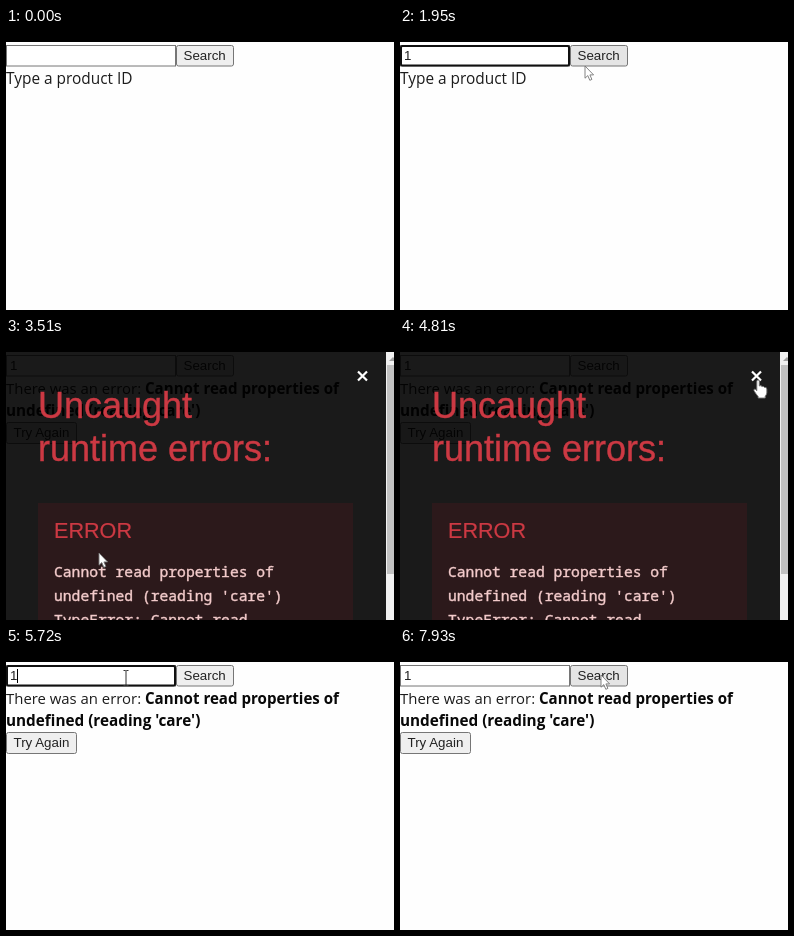
Recreate the animation shown at these times as an HTML page. Size 388 by 282 pixels, loop 8 s.

```html
<!DOCTYPE html>
<html lang="en">
<head>
<meta charset="utf-8">
<title>Product search error</title>
<style>
  html, body { margin: 0; width: 100%; height: 100%; overflow: hidden; background: #fefefe; }
  svg { display: block; width: 388px; height: 282px; }
  text { white-space: pre; }
  .ui { font: 13.333px "Liberation Sans", Arial, sans-serif; fill: #222; }
  .body { font-family: "Open Sans", "Noto Sans", sans-serif; font-size: 14.9px; fill: #1c1c1c; }
  .bold { font-size: 15.1px; font-weight: 700; fill: #080808; }
  .box { stroke: #767676; }
  .head { font-family: "Liberation Sans", Arial, sans-serif; fill: #cc3943; stroke: #cc3943; stroke-width: .4; }
  .mono { font: 500 14.66px "Noto Sans Mono", "DejaVu Sans Mono", monospace; fill: #f3cbcb; stroke: #f3cbcb; stroke-width: .4; }
  .pointer { fill: #fff; stroke: #777; stroke-width: .9; }
</style>
</head>
<body>
<svg viewBox="0 0 388 282">
  <rect width="388" height="282" fill="#fefefe"/>

  <rect class="box" x=".5" y="17.5" width="169" height="20.5" fill="#fff"/>
  <rect id="ring" x="1" y="18" width="168" height="19.5" rx="1.5" fill="#fff" stroke="#101010" stroke-width="2"/>
  <text id="value" class="ui" x="4" y="32">1</text>
  <rect id="caret" y="21" width="1" height="14"/>

  <rect id="search" class="box" x="170.5" y="17.5" width="57" height="20.5" rx="2"/>
  <text class="ui" x="177.5" y="32">Search</text>

  <text id="hint" class="body" x="0" y="56" style="font-size:15.4px">Type a product ID</text>

  <g id="failure">
    <text class="body" x="0" y="56">There was an error: </text>
    <text class="body bold" x="139" y="56">Cannot read properties of</text>
    <text class="body bold" x="0" y="77.5" style="font-size:15.3px">undefined (reading 'care')</text>
    <rect class="box" x=".5" y="84.5" width="70" height="21" rx="2" fill="#efefef"/>
    <text class="ui" x="7.5" y="99">Try Again</text>
  </g>

  <g id="overlay">
    <rect y="14" width="380" height="268" fill="#000" opacity=".898"/>
    <rect x="32" y="165" width="315" height="117" fill="#2c191b"/>
    <g class="head">
      <text x="32" y="80" font-size="36">Uncaught</text>
      <text x="32" y="123" font-size="36">runtime errors:</text>
      <text x="48" y="200" font-size="21.6" stroke-width=".2">ERROR</text>
    </g>
    <g class="mono">
      <text x="48" y="239">Cannot read properties of</text>
      <text x="48" y="263">undefined (reading 'care')</text>
      <text x="48" y="287">TypeError: Cannot read</text>
    </g>
    <path d="M352 33.5l9 9m0-9l-9 9" stroke="#fff" stroke-width="2.2"/>
    <rect x="380" y="14" width="8" height="268" fill="#f1f1f1"/>
    <rect x="381" y="27" width="7" height="209" fill="#c1c1c1"/>
    <path d="M383 23l4-4 1 1v3z" fill="#a0a0a0"/>
  </g>

  <rect width="388" height="14"/>

  <g id="cursor" stroke-linejoin="round">
    <path id="arrow" class="pointer" d="M0 0V12.2L2.8 9.6 4.8 14.3 6.9 13.4 4.9 8.9H8.6Z"/>
    <path id="beam" d="M-2.5-7.5H-.6L0-7 .6-7.5H2.5M0-7V7M-2.5 7.5H-.6L0 7 .6 7.5H2.5" fill="none" stroke="#333"/>
    <path id="hand" class="pointer" d="M-1.2 1.4Q-1.2 0 0 0T1.3 1.4V6Q3.2 5 3.9 6.6 5.8 6 6.4 7.4 8.6 7 8.8 9V13Q8.4 15 7.2 16.2V18H.2V16.6Q-2 14-4 10.7-4.6 8.8-2.8 9.2L-1.2 10.8Z"/>
  </g>
</svg>
<script>
const LOOP = 8000, TICK = 130;
const ERROR_AT = 3510, CLOSE_AT = 4940;

// Pointer stops: time, x, y
const stops = [
  [130, 112, 172], [520, 134, 30], [1170, 134, 30],
  [1950, 185, 38], [2340, 199, 28], [2730, 199, 28],
  [3510, 93, 215], [3640, 93, 215], [4550, 358, 42],
  [4940, 358, 42], [5720, 120, 30], [6760, 120, 30],
  [7410, 201, 27], [LOOP, 201, 27]
];

const $ = id => document.getElementById(id);
const show = (id, on) => $(id).setAttribute("visibility", on ? "inherit" : "hidden");
const within = (t, ...spans) => spans.some(([a, b]) => t >= a && t < b);
const ease = k => k * k * (3 - 2 * k);

function pointerAt(t) {
  const i = stops.findIndex(s => s[0] > t);
  if (i < 1) return stops[0].slice(1);
  const [t0, x0, y0] = stops[i - 1], [t1, x1, y1] = stops[i];
  const k = ease((t - t0) / (t1 - t0));
  return [x0 + (x1 - x0) * k, y0 + (y1 - y0) * k];
}

function render(time) {
  const t = Math.floor(time / TICK) * TICK;
  const [x, y] = pointerAt(t);
  const visible = within(t, [130, 1170], [1950, 6110], [6890, LOOP]);
  const failed = t >= ERROR_AT;
  const overlay = failed && t < CLOSE_AT;
  const typed = within(t, [1430, 6110], [6370, LOOP]);
  const inRow = y >= 17 && y <= 39;
  const hand = failed && Math.hypot(x - 356, y - 38) < 10;
  const beam = !overlay && inRow && x < 170;
  const hover = visible && !overlay && inRow && x >= 170 && x < 228;

  show("ring", within(t, [520, 2470], [5720, 7670]));
  show("value", typed);
  show("caret", within(t, [520, 1170], [1430, 1950], [5720, 6890]));
  $("caret").setAttribute("x", typed ? 11 : 4);
  $("search").setAttribute("fill", hover ? "#e5e5e5" : "#efefef");
  show("hint", !failed);
  show("failure", failed);
  show("overlay", overlay);

  show("cursor", visible);
  $("cursor").setAttribute("transform", `translate(${x} ${y})`);
  show("hand", hand);
  show("beam", beam);
  show("arrow", !hand && !beam);
}

function frame() {
  render(performance.now() % LOOP);
  requestAnimationFrame(frame);
}
frame();
</script>
</body>
</html>
```
